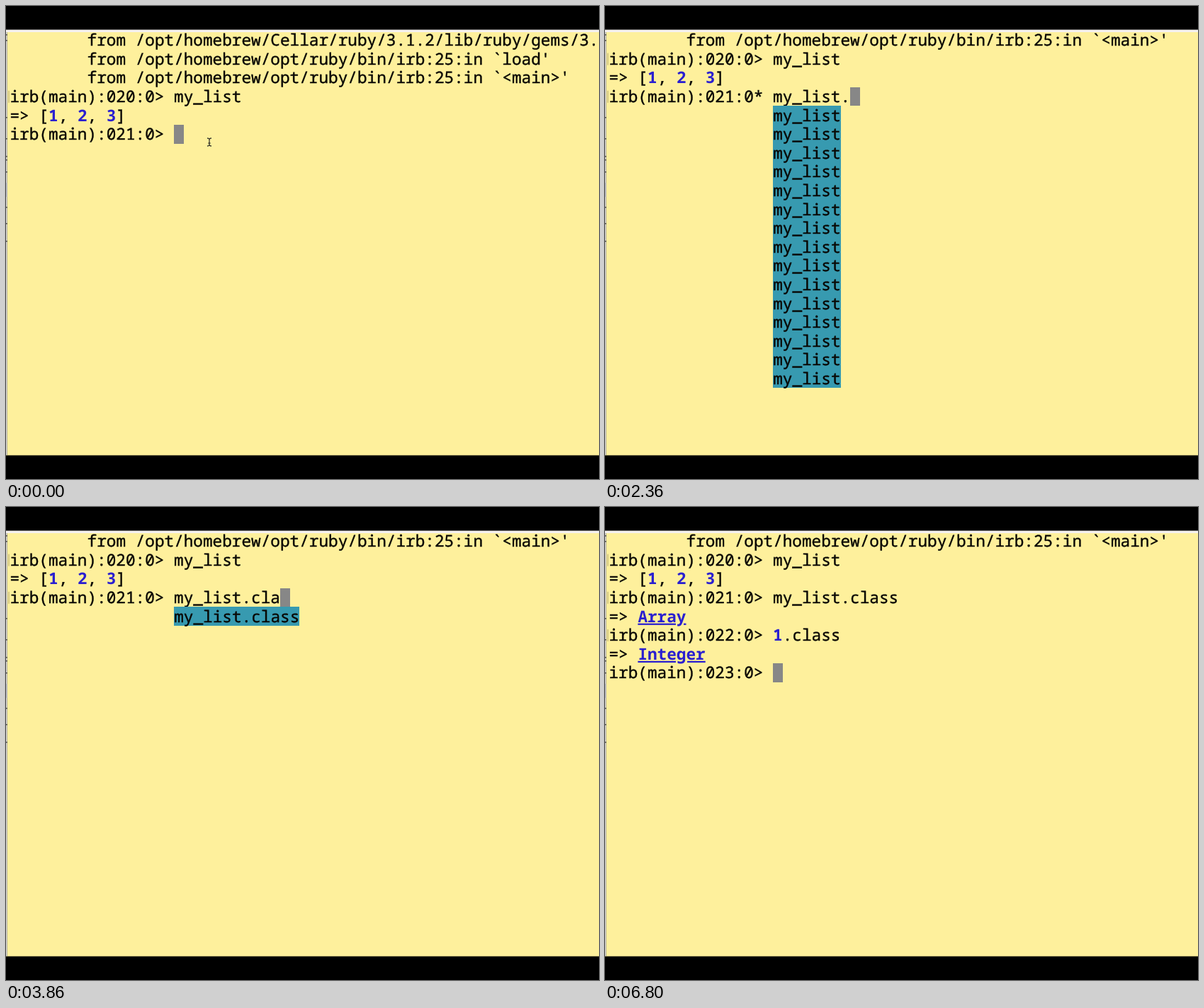
Write an HTML page that moves like this. It is 837x669 px and loops after 8 s.

```html
<!DOCTYPE html>
<html lang="en">
<head>
<meta charset="utf-8">
<title>irb session</title>
<style>
  html, body { margin: 0; width: 100%; height: 100%; overflow: hidden; background: #000; }
  svg { display: block; width: 100%; height: 100%; }
  text {
    font: 22.717px "Noto Sans Mono", "DejaVu Sans Mono", monospace;
    fill: #080703;
    stroke: #080703;
    stroke-width: 0.4px;
    text-rendering: geometricPrecision;
    font-variant-ligatures: none;
    white-space: pre;
  }
  .num, .cls { font-weight: 700; fill: #2a1fd0; stroke: none; }
  .cls { text-decoration: underline; text-decoration-thickness: 1.6px; text-underline-offset: 2px; }
</style>
</head>
<body>
<svg viewBox="0 0 837 669" preserveAspectRatio="none">
  <rect width="837" height="669" fill="#000"/>
  <rect y="33.5" width="837" height="4" fill="#f5f1ee"/>
  <rect y="37" width="837" height="598.5" fill="#fef09c"/>
  <g id="edge"></g>
  <g id="term"></g>
  <path id="mouse" d="M-3-5.5Q0-5.5 0-3.5Q0-5.5 3-5.5M0-4V4M-3 5.5Q0 5.5 0 3.5Q0 5.5 3 5.5M-1.5 1.5H1.5"
        fill="none" stroke="#3a382c" stroke-width="1.3"/>
</svg>
<script>
const LOOP = 8000, CELL = 13.63, ROW = 26.6, LEFT = 5.5, TOP = 35, BASE = 21.2, INPUT = 17;
const $ = id => document.getElementById(id);
const colX = c => LEFT + c * CELL;
const rowY = r => TOP + r * ROW;
const box = (x, y, w, h, fill) => `<rect x="${x}" y="${y}" width="${w}" height="${h}" fill="${fill}"/>`;
const words = (prefix, list) => list.split(' ').map(w => prefix + w);

// block of terminal cells, snapped to whole pixels
function cells(c, r, w, h, fill) {
  const x = Math.round(colX(c)), y = Math.round(rowY(r));
  return box(x, y, Math.round(colX(c + w)) - x, Math.round(rowY(r + h)) - y, fill);
}

// {..} marks a number, ~..~ a class name
const markup = s => s.replace(/&/g, '&amp;').replace(/</g, '&lt;').replace(/>/g, '&gt;')
  .replace(/\{(.+?)\}/g, '<tspan class="num">$1</tspan>')
  .replace(/~(.+?)~/g, '<tspan class="cls">$1</tspan>');
const text = (c, r, s) => `<text x="${colX(c)}" y="${rowY(r) + BASE}">${markup(s)}</text>`;

const history = [
  [8, 'from /opt/homebrew/Cellar/ruby/3.1.2/lib/ruby/gems/3.'],
  [8, 'from /opt/homebrew/opt/ruby/bin/irb:25:in `load\''],
  [8, 'from /opt/homebrew/opt/ruby/bin/irb:25:in `<main>\''],
  [0, 'irb(main):020:0> my_list'],
  [0, '=> [{1}, {2}, {3}]'],
  [0, 'irb(main):021:0> my_list.class'],
  [0, '=> ~Array~'],
  [0, 'irb(main):022:0> {1}.class'],
  [0, '=> ~Integer~']
];

const doc = [
  'Press Option+d to read the full docum', 'Array < Object', '', '-'.repeat(37),
  'Includes:', 'Enumerable (from ruby core)', '', '(from ruby core)', '-'.repeat(37),
  'An Array is an ordered,', 'integer-indexed collection of', 'objects, called elements. Any object',
  'may be an Array element.', '', 'Array Indexes', '', 'Array indexing starts at 0, as in C',
  'or Java.'
];

const list = ['my_list'], listClass = ['my_list.class'], oneClass = ['1.class'];
const forM = words('', 'measure methods method method_missing my_list module');
const forC = words('my_list.', 'count cycle concat clear collect collect! combination compact compact! ' +
  'collect_concat chain chunk chunk_while class clone');
const forOne = words('1.', 'numerator denominator rationalize gcd lcm gcdlcm allbits? anybits? nobits? ' +
  'bit_length ceil chr coerce digits div');

// time, prompt number, typed text, completions, popup width when it scrolls
const steps = [
  [0, 21, ''],
  [630, 21, 'm'],
  [730, 21, 'm', forM],
  [830, 21, 'my', list],
  [1300, 21, 'my_list', list],
  [1367, 21, 'my_list', list],
  [1430, 21, 'my_list', list],
  [2360, 21, 'my_list.', Array(15).fill('my_list')],
  [2500, 21, 'my_list.c', forC],
  [2567, 21, 'my_list.ck'],
  [2633, 21, 'my_list.cka'],
  [2700, 21, 'my_list.ckas'],
  [2860, 21, 'my_list.ckass'],
  [3160, 21, 'my_list.ckas'],
  [3330, 21, 'my_list.cka'],
  [3430, 21, 'my_list.ck'],
  [3560, 21, 'my_list.c', forC],
  [3730, 21, 'my_list.cl', words('my_list.', 'clear class clone')],
  [3860, 21, 'my_list.cla', listClass],
  [4030, 21, 'my_list.clas', listClass],
  [4160, 21, 'my_list.class', listClass],
  [4330, 22, ''],
  [5760, 22, '{1}'],
  [5930, 22, '{1}.', forOne, 34],
  [6200, 22, '{1}.c', words('1.', 'ceil chr coerce clamp class clone')],
  [6371, 22, '{1}.cl', words('1.', 'clamp class clone')],
  [6457, 22, '{1}.cla', oneClass],
  [6543, 22, '{1}.clas', oneClass],
  [6629, 22, '{1}.class', oneClass],
  [6714, 22, '{1}.class'],
  [6800, 23, '']
];

function popup(row, items, width) {
  const wide = width || Math.max(...items.map(s => s.length));
  let out = cells(INPUT, row, wide, items.length, '#379ab0');
  if (width) out += cells(INPUT + wide - 1, row, 1, 2, '#c9cccb');
  return out + items.map((s, i) => text(INPUT, row + i, s)).join('');
}

function draw([t, num, typed, items, width]) {
  const scroll = t >= 1367 ? 2 : 0;
  const line = 5 + (num - 21) * 2, row = line - scroll;
  const sign = t >= 2360 && t < 3160 ? '*' : '>';
  const rows = [...history.slice(0, line), [0, `irb(main):0${num}:0${sign} ${typed}`]].slice(scroll);
  let out = '';
  rows.forEach(([c, s], r) => {
    const marked = s.startsWith('irb') && (r < row || (num === 21 && t >= 1300));
    if (marked) out += box(3.5, rowY(r) + 5, 1, 17, '#a79f70');
    out += text(c, r, s);
  });
  const end = INPUT + typed.replace(/[{}]/g, '').length;
  out += cells(end, row, 1, 1, '#878787');
  if (items) out += popup(row + 1, items, width);
  if (t >= 1430 && t < 2360) out += doc.map((s, i) => text(INPUT + 7, row + 1 + i, s)).join('');
  $('term').innerHTML = out;
}

// sliver of the window behind
$('edge').innerHTML = box(0, 37, 2, 598, '#dcd9cf') + box(1.2, 37, 0.8, 598, '#a9a694') +
  box(0, 250, 2, 20, '#b9b9b9') +
  [40, 48, 157, 187, 212, 217, 234, 284, 307, 332].map(y => box(0, y, 2, 1.5, '#55534c')).join('');

const path = [[0, 287], [30, 297], [63, 311], [97, 320], [130, 324]];
const at = (table, t) => table.filter(s => s[0] <= t).pop();

let shown;
function frame() {
  const t = performance.now() % LOOP;
  const step = at(steps, t);
  if (step !== shown) draw(shown = step);
  $('mouse').setAttribute('transform', `translate(${at(path, t)[1]} 192.5)`);
  $('mouse').setAttribute('visibility', t < 630 ? 'visible' : 'hidden');
  requestAnimationFrame(frame);
}
frame();
</script>
</body>
</html>
```
